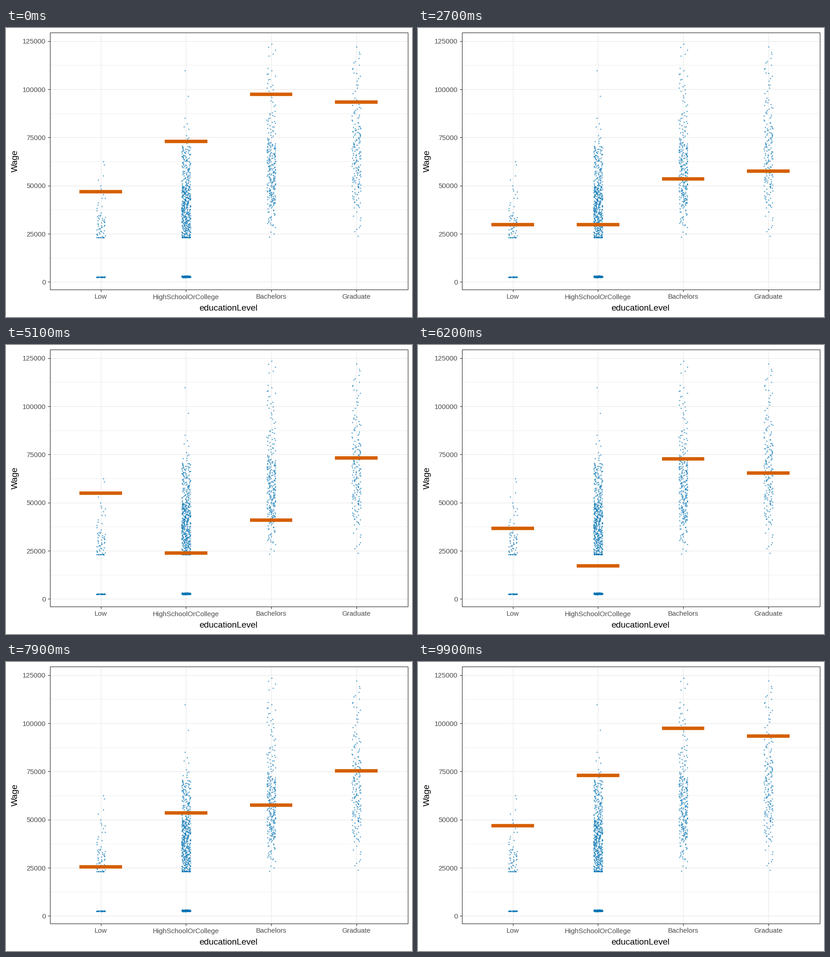
Animation, 885 px wide and 632 px high, one loop 10 s. Source, as a matplotlib script:

```python
import numpy as np
import matplotlib.pyplot as plt
from matplotlib.animation import FuncAnimation
from matplotlib.collections import LineCollection

W, H, DPI = 885, 632, 100
PT = 72 / DPI  # points per pixel
BLUE, ORANGE = "#0072B2", "#D55E00"
LEFT, RIGHT, TOP, BOTTOM = 95.5, 875.5, 9.5, 571.5
UNIT = 185.65
LEVELS = ["Low", "HighSchoolOrCollege", "Bachelors", "Graduate"]
CENTERS = 206.7 + UNIT * np.arange(4)

plt.rcParams["font.family"] = "Liberation Sans"
fig = plt.figure(figsize=(W / DPI, H / DPI), dpi=DPI, facecolor="white")
ax = fig.add_axes([0, 0, 1, 1])
ax.set(xlim=(0, W), ylim=(H, 0))
ax.axis("off")


def wage_y(wage):
    return 555.2 - wage * 0.0042136


def line(x, y, color, width, z):
    ax.plot(x, y, color=color, lw=width * PT, solid_capstyle="butt", zorder=z)


def label(x, y, text, size, color, **kw):
    ax.text(x, y, text, fontsize=size * PT, color=color, va="baseline", **kw)


# Panel, grid and axes
for wage in range(12500, 125000, 25000):
    line([LEFT, RIGHT], [wage_y(wage)] * 2, "#EBEBEB", 0.8, 1)
for wage in range(0, 125001, 25000):
    y = wage_y(wage)
    line([LEFT, RIGHT], [y, y], "#EBEBEB", 1.4, 1)
    line([90.5, LEFT], [y, y], "#333333", 1.2, 5)
    label(86.5, y + 5.7, str(wage), 15, "#4D4D4D", ha="right")
for x, name in zip(CENTERS, LEVELS):
    line([x, x], [TOP, BOTTOM], "#EBEBEB", 1.4, 1)
    line([x, x], [BOTTOM, 576.5], "#333333", 1.2, 5)
    label(x, 592.5, name, 15, "#4D4D4D", ha="center")
ax.add_patch(plt.Rectangle((LEFT, TOP), RIGHT - LEFT, BOTTOM - TOP, fill=False,
                           ec="#333333", lw=1.2 * PT, zorder=5))
label(485.3, 618, "educationLevel", 19, "black", ha="center")
label(25.3, 290.5, "Wage", 19, "black", ha="center", rotation=90,
      rotation_mode="anchor")

# Wages per level: a few top earners (dx, y), then bands (top, bottom, count)
EARNERS = [
    [(5, 292), (7, 299), (5, 323), (-6, 332)],
    [(-2, 93), (5, 149), (-2, 197), (3, 208.5), (-4, 215.5), (6, 221)],
    [(1, 35), (-6, 42), (9, 48), (4, 57), (-5, 61)],
    [(0, 41), (6, 53), (7, 57)],
]
BANDS = [
    [(342, 408, 13), (408, 456, 38), (457.5, 458.5, 13), (543.8, 545.6, 32)],
    [(235, 258, 7), (258, 345, 116), (345, 436, 280), (436, 456, 55),
     (456.8, 458.5, 36), (542, 545.6, 130)],
    [(87, 172, 20), (182, 250, 32), (250, 388, 190), (388, 436, 24),
     (441, 458, 3)],
    [(63, 145, 16), (152, 215, 24), (215, 350, 109), (350, 394, 22),
     (402, 456, 9)],
]
rng = np.random.default_rng(7)
for center, earners, bands in zip(CENTERS, EARNERS, BANDS):
    dx, ys = (list(v) for v in zip(*earners))
    for top, bottom, n in bands:
        ys.extend(top + (np.arange(n) + rng.uniform(0, 1, n)) * (bottom - top) / n)
        dx.extend(rng.uniform(-9.6, 9.6, n))
    ax.scatter(center + np.array(dx), ys, s=(2.8 * PT) ** 2, color=BLUE,
               alpha=0.62, linewidths=0, zorder=2)

# Bar heights of each draw, in pixels from the top; L, S, B, G are typical wages
L, S, B, G = 430, 402, 330, 288
MINIMUM, NONE_L, NONE_S = 458, 545, 543.5
DRAWS = np.array([
    [357.7, 247.7, 144.7, 161.7], [407, S, B, G], [NONE_L, S, B, 142],
    [L, NONE_S, B, 240], [419.2, 343, 322.4, 367.2], [L, NONE_S, B, 329],
    [L, S, B, 345], [L, MINIMUM, B, 280], [L, S, B, G],
    [MINIMUM, 293.5, 350.7, 245.2], [NONE_L, S, B, 251], [L, S, B, G],
    [L, S, B, G], [323.7, 454.5, 383, 247.2], [NONE_L, S, B, G],
    [378, NONE_S, 220, 290], [424.6, 422.5, 278.4, 270.2], [439, S, B, G],
    [L, S, 35, G], [MINIMUM, S, B, 143], [448, 330.2, 312.5, 238.2],
    [NONE_L, S, B, G], [441, S, B, 205], [405, S, 170, G], [400, 409, B, 42],
])
N = len(DRAWS)
# Each draw holds for three frames, with one halfway frame before the next
STARTS = np.array([4 * k - (k > N // 2) for k in range(N + 1)])

bars = LineCollection([], colors=ORANGE, linewidths=7.5 * PT, capstyle="butt",
                      zorder=3)
ax.add_collection(bars, autolim=False)


def heights(frame):
    k = np.searchsorted(STARTS, frame, side="right") - 1
    now, following = DRAWS[k % N], DRAWS[(k + 1) % N]
    halfway = k < N and frame + 1 == STARTS[k + 1]
    return (now + following) / 2 if halfway else now


def update(frame):
    bars.set_segments([[(x - UNIT / 4, y), (x + UNIT / 4, y)]
                       for x, y in zip(CENTERS, heights(frame))])
    return [bars]


anim = FuncAnimation(fig, update, frames=100, interval=100, repeat=True,
                     repeat_delay=0, blit=False)
plt.show()
```
